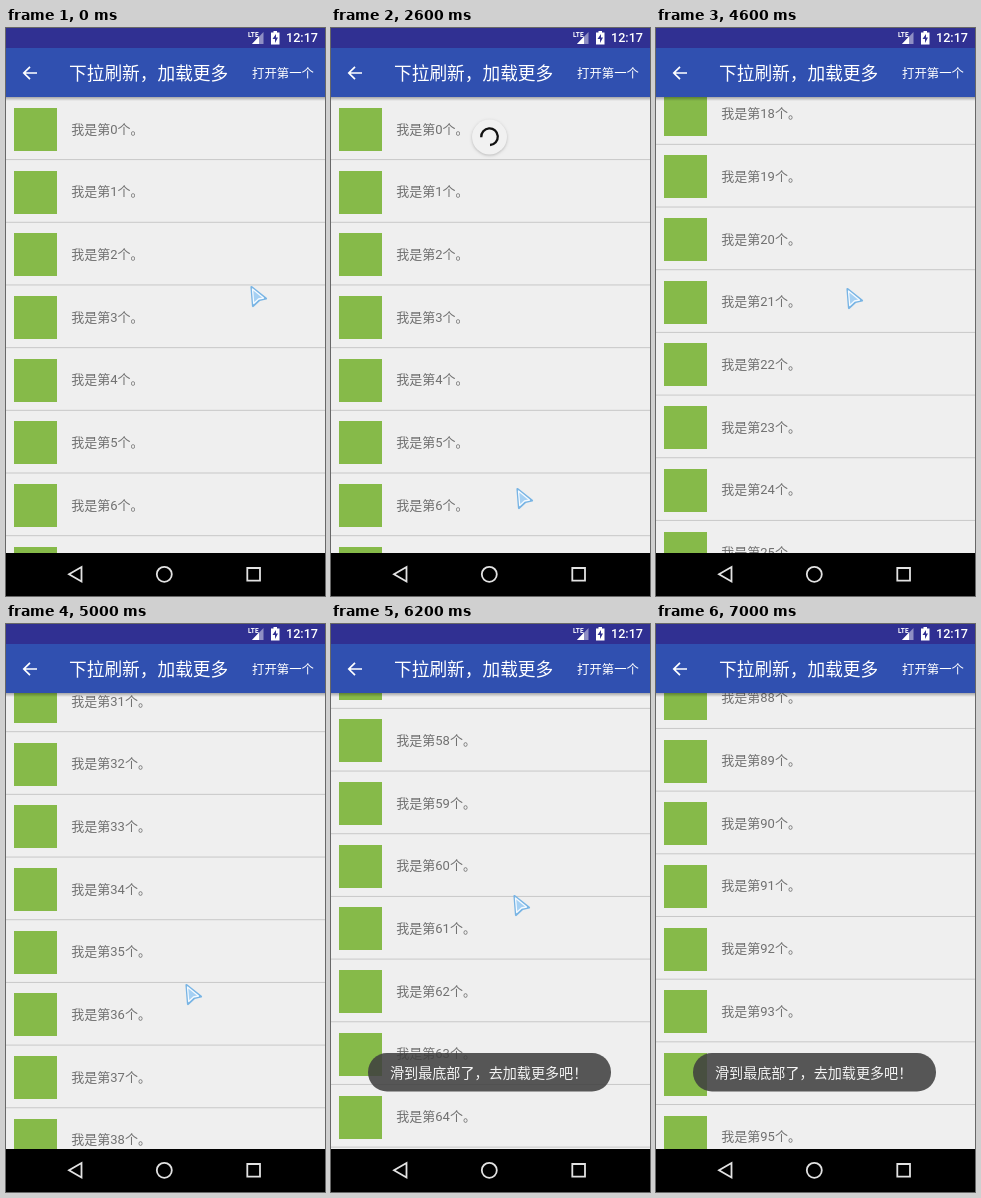
These frames come from a looping animation (319x568 px, 7.2 s). An HTML page with a canvas:

```html
<!DOCTYPE html>
<html lang="zh-CN">
<head>
<meta charset="utf-8">
<style>
  html, body { margin: 0; width: 100%; height: 100%; overflow: hidden; background: #000; }
  canvas { display: block; }
</style>
</head>
<body>
<canvas id="stage" width="319" height="568"></canvas>
<script>
const ctx = document.getElementById('stage').getContext('2d');
const LOOP = 7200, STEP = 200, PITCH = 62.68;
const FONT = 'Roboto, "Noto Sans CJK SC", "Noto Sans CJK", sans-serif';

// Keys are [step, value...]
const SCROLL = [[0, 0], [14, 0], [15, 25], [16, 110], [17, 220], [18, 300], [20, 300], [21, 320],
  [25, 1967], [27, 3040], [28, 3140], [29, 3140], [31, 3620], [32, 3960], [35, 5543]];
const POINTER = [[0, 244, 258], [2, 200, 250], [3, 192, 290], [6, 186, 422], [12, 185, 457], [13, 185, 460],
  [14, 185, 460], [18, 192, 270], [20, 192, 270], [21, 193, 258], [22, 190, 390], [23, 190, 260],
  [24, 184, 430], [25, 179, 360], [26, 185, 270], [27, 192, 440], [28, 198, 474], [29, 195, 440],
  [31, 182, 271], [32, 185, 430], [34, 185, 270]];

function valueAt(keys, step) {
  const next = keys.findIndex(key => key[0] > step);
  if (next < 0) return keys[keys.length - 1].slice(1);
  const a = keys[next - 1], b = keys[next], k = (step - a[0]) / (b[0] - a[0]);
  return a.slice(1).map((v, i) => v + (b[i + 1] - v) * k);
}

function rect(color, x, y, w, h) {
  ctx.fillStyle = color;
  ctx.fillRect(x, y, w, h);
}

function text(str, x, y, size, color, weight = 400) {
  ctx.font = `${weight} ${size}px ${FONT}`;
  ctx.fillStyle = color;
  ctx.fillText(str, x, y);
}

function shape(path, fill, stroke, width = 1) {
  const p = new Path2D(path);
  if (fill) { ctx.fillStyle = fill; ctx.fill(p); }
  if (stroke) { ctx.strokeStyle = stroke; ctx.lineWidth = width; ctx.stroke(p); }
}

function drawList(scroll) {
  rect('#efefef', 0, 69, 319, 457);
  const first = Math.max(0, Math.floor(scroll / PITCH) - 1);
  for (let n = first; n < first + 10; n++) {
    const y = 101 + n * PITCH - scroll;
    rect('#86ba49', 8, Math.round(y - 21), 43, 43);
    text(`我是第${n}个。`, 65.3, y + 4.5, 13, '#707070');
    rect('#c8c8c8', 0, y + 30.1, 319, 1);
  }
}

function drawSpinner(step) {
  ctx.save();
  ctx.shadowColor = 'rgba(0,0,0,.22)';
  ctx.shadowBlur = 3;
  ctx.shadowOffsetY = 1;
  ctx.fillStyle = '#f1f1f1';
  ctx.beginPath();
  ctx.arc(158.5, 109, 17.5, 0, 7);
  ctx.fill();
  ctx.restore();
  const phase = (step - 13) * STEP / 1332;
  const start = Math.PI * (0.98 + 2.4 * phase);
  const sweep = Math.PI * (0.8 + 0.7 * Math.cos(phase * 2 * Math.PI));
  ctx.strokeStyle = '#111';
  ctx.lineWidth = 2.3;
  ctx.beginPath();
  ctx.arc(158.5, 108.7, 8.3, start, start + sweep);
  ctx.stroke();
}

function drawToast(alpha) {
  ctx.fillStyle = `rgba(64,64,64,${alpha})`;
  ctx.beginPath();
  ctx.roundRect(37, 429, 243, 38.5, 19);
  ctx.fill();
  text('滑到最底部了，去加载更多吧！', 59, 453.6, 14.1, '#f4f4f4');
}

function drawBars() {
  const shadow = ctx.createLinearGradient(0, 69, 0, 73);
  shadow.addColorStop(0, 'rgba(0,0,0,.3)');
  shadow.addColorStop(1, 'rgba(0,0,0,0)');
  rect(shadow, 0, 69, 319, 4);
  rect('#303092', 0, 0, 319, 20);
  rect('#3050b0', 0, 20, 319, 49);

  text('LTE', 242, 8.5, 6.5, '#fff', 700);
  shape('M246 16L257.5 4V16Z', '#8f8fc4');
  shape('M246 16L253 8.5V16Z', '#fff');
  shape('M265 4.5H267.5V3H271V4.5H273.5V16.5H265Z', '#fff');
  shape('M270 6L266.5 11H269V15L272 9.5H270Z', '#303092');
  text('12:17', 280, 14.3, 12.6, '#fff', 500);

  shape('M31 45H18M24 38.8L17.8 45L24 51.2', null, '#fff', 1.7);
  text('下拉刷新，加载更多', 63, 51.7, 17.7, '#fff', 500);
  text('打开第一个', 246, 49.7, 12.4, '#fff', 500);

  rect('#000', 0, 525, 319, 43);
  shape('M75.5 539V553.5L63 546.2Z', null, '#e2e2e2', 1.8);
  shape('M150.8 546.3a7.5 7.5 0 1 0 15 0a7.5 7.5 0 1 0 -15 0Z', null, '#e2e2e2', 1.8);
  shape('M241.3 540H254V552.7H241.3Z', null, '#e2e2e2', 1.8);
}

function drawPointer([x, y]) {
  ctx.save();
  ctx.translate(x, y);
  ctx.lineJoin = 'round';
  shape('M1.5 1L16 12.5L9.5 14L3 20Z', '#a9d3f4', '#78b4e4', 2.2);
  shape('M2.5 3L13.5 12L8.5 13L3.7 17.5Z', '#a5d0f3', '#f4faff', 1.3);
  ctx.restore();
}

function draw(step) {
  drawList(valueAt(SCROLL, step)[0]);
  if (step >= 3 && step <= 13) drawSpinner(step);
  if (step === 28 || step === 29) shape('M0 515Q159.5 495 319 515V526H0Z', 'rgba(205,205,238,.5)');
  drawBars();
  if (step >= 28) drawToast(step === 28 ? 0.75 : 0.87);
  if (step < 35) drawPointer(valueAt(POINTER, step));
}

function tick() {
  draw(Math.floor(performance.now() % LOOP / STEP));
  requestAnimationFrame(tick);
}
tick();
</script>
</body>
</html>
```
